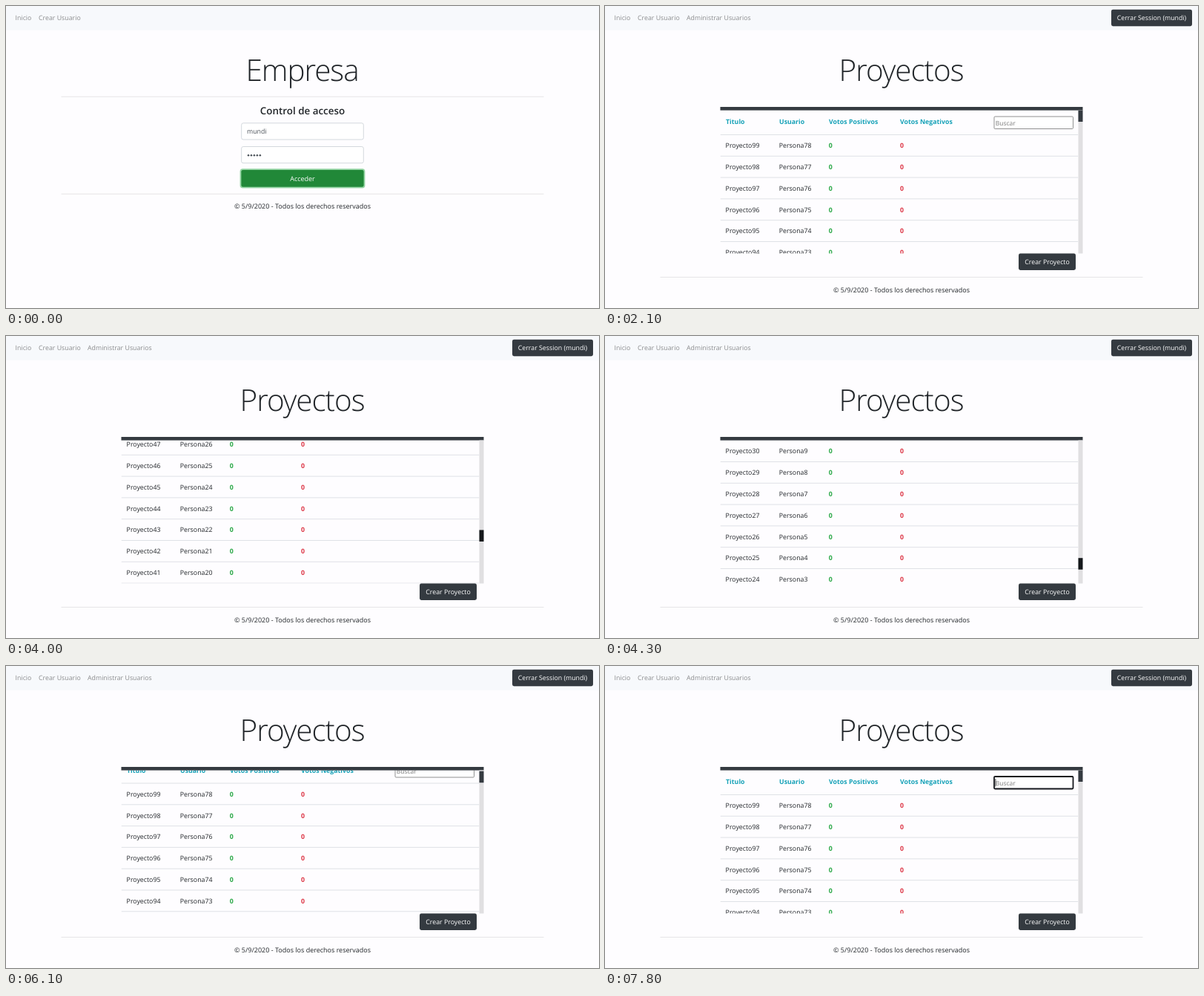
These frames come from a looping animation (800x407 px, 8 s). An HTML page:

```html
<!DOCTYPE html>
<html lang="es">
<head>
<meta charset="utf-8">
<title>Proyectos</title>
<style>
  html, body { margin: 0; width: 100%; height: 100%; overflow: hidden; background: #fefdff; }
  svg { display: block; }
  text {
    font: 8.8px "Open Sans", "Noto Sans", sans-serif;
    fill: #212529;
    text-rendering: geometricPrecision;
    white-space: pre;
  }
  .mid { text-anchor: middle; }
  .title { font-size: 40.5px; font-weight: 300; letter-spacing: -1.1px; }
  .sub { font-size: 13.4px; font-weight: 600; }
  .foot, .access { font-size: 9px; }
  .nav { fill: #8b8c8e; }
  .field { fill: #495057; }
  .hint { font-size: 8.5px; fill: #7d7d7d; }
  .light { fill: #fff; }
  .head, .up, .down { font-weight: 700; }
  .head { fill: #17a2b8; }
  .up { fill: #28a745; }
  .down { fill: #dc3545; }
</style>
</head>
<body>
<svg id="stage" width="800" height="407" viewBox="0 0 800 407">
  <defs><clipPath id="view"><rect x="155.5" y="140.5" width="483" height="193"/></clipPath></defs>
</svg>
<script>
const LOOP = 8000, STEP = 100;
const ROWS = 84, ROW_H = 28.8, MAX_SCROLL = 2259;
const VIEW_TOP = 140.5, THUMB_RUN = 177.5;
const DARK = '#343a40';

// time, scroll offset
const SCROLL = [
  [3700, 0], [3800, 400], [4000, 1539.6], [4200, 1960], [4350, 2050], [4500, 1930],
  [4700, 1727.2], [5000, 820], [5300, 0], [5800, 0], [6100, 15.5],
  [6400, 280], [6700, 520], [6800, 520], [7200, 160], [7500, 0]
];

const stage = document.getElementById('stage');

function add(parent, tag, attrs, content) {
  const el = document.createElementNS('http://www.w3.org/2000/svg', tag);
  for (const key in attrs) el.setAttribute(key, attrs[key]);
  if (content !== undefined) el.textContent = content;
  parent.appendChild(el);
  return el;
}
const group = (parent, attrs = {}) => add(parent, 'g', attrs);
const label = (parent, x, y, content, cls = '') => add(parent, 'text', { x, y, class: cls }, content);
const box = (parent, x, y, width, height, fill, more = {}) =>
  add(parent, 'rect', { x, y, width, height, fill, ...more });
const rule = (parent, x, y, width, fill = '#e6e5e7') => box(parent, x, y, width, 1, fill);

function footer(parent, y) {
  rule(parent, 74.5, y, 651);
  label(parent, 400, y + 20.5, '© 5/9/2020 - Todos los derechos reservados', 'foot mid');
}

function button(parent, x, y, width, content) {
  box(parent, x, y, width, 22.5, DARK, { rx: 2.4 });
  label(parent, x + width / 2, y + 14.5, content, 'light mid');
}

// Shared navigation bar
box(stage, 0, 0, 800, 407, '#fefdff');
box(stage, 0, 0, 800, 32.5, '#f7f9fc');
label(stage, 12.6, 19.3, 'Inicio', 'nav');
label(stage, 44, 19.3, 'Crear Usuario', 'nav');

// Access form
const login = group(stage);
label(login, 399.5, 101.2, 'Empresa', 'title mid');
rule(login, 74.5, 121.7, 651);
label(login, 400, 146, 'Control de acceso', 'sub mid');
for (const y of [157.8, 189.5])
  box(login, 317.7, y, 164.6, 22.2, '#fff', { rx: 2.4, stroke: '#ced4da', 'stroke-width': 0.9 });
label(login, 325, 172.3, 'mundi', 'field');
for (let i = 0; i < 5; i++)
  add(login, 'circle', { cx: 327 + i * 3.95, cy: 201.2, r: 1.25, fill: '#495057' });
box(login, 315.6, 219.3, 168.8, 26.2, '#93d4a2', { rx: 3.8 });
const access = box(login, 317.4, 221.1, 165.2, 22.7, '#28a745', { rx: 2.2 });
label(login, 400, 235.8, 'Acceder', 'access light mid');
footer(login, 252.8);

// Project list
const projects = group(stage);
label(projects, 110, 19.3, 'Administrar Usuarios', 'nav');
button(projects, 683, 4.7, 109, 'Cerrar Session (mundi)');
label(projects, 399.5, 101.2, 'Proyectos', 'title mid');

const list = group(group(projects, { 'clip-path': 'url(#view)' }));
[[163, 'Titulo'], [235, 'Usuario'], [302, 'Votos Positivos'], [398, 'Votos Negativos']]
  .forEach(([x, name]) => label(list, x, 159, name, 'head'));
const search = box(list, 525, 149, 106.5, 16.5, '#fff', { rx: 1.2 });
label(list, 526.8, 160.5, 'Buscar', 'hint');
const caret = box(list, 526.5, 152, 0.8, 10.5, '#222');

for (let i = 0; i < ROWS; i++) {
  const n = 99 - i, y = 191.2 + i * ROW_H;
  rule(list, 155.5, y - 18.2, 483, '#dfe2e6');
  label(list, 162.6, y, 'Proyecto' + n);
  label(list, 234.8, y, 'Persona' + (n > 21 ? n - 21 : n));
  label(list, 301.8, y, '0', 'up');
  label(list, 398, y, '0', 'down');
}

box(projects, 155.5, 136, 489, 4.6, DARK);
box(projects, 638.5, VIEW_TOP, 6, 193, '#e0dfe1');
const thumb = box(projects, 638.5, VIEW_TOP, 6, 15.5, DARK);
button(projects, 558, 333.5, 77, 'Crear Proyecto');
footer(projects, 365);

function scrollAt(t) {
  const next = SCROLL.findIndex(key => key[0] > t);
  if (next <= 0) return 0;
  const [t0, a] = SCROLL[next - 1], [t1, b] = SCROLL[next];
  return a + (b - a) * (t - t0) / (t1 - t0);
}

function draw(now) {
  const t = Math.floor(now % LOOP / STEP) * STEP;
  const onList = t >= 2100;
  login.style.display = onList ? 'none' : '';
  projects.style.display = onList ? '' : 'none';
  access.setAttribute('fill', t < 1300 ? '#218838' : '#28a745');

  const scroll = scrollAt(t);
  list.setAttribute('transform', `translate(0 ${-scroll})`);
  thumb.setAttribute('y', VIEW_TOP + scroll / MAX_SCROLL * THUMB_RUN);
  thumb.setAttribute('fill', t >= 3100 && t < 5300 ? '#15181b' : DARK);

  const focus = t >= 7800, hover = t === 2700;
  search.setAttribute('stroke', focus ? '#15171c' : hover ? '#4f4f4f' : '#858585');
  search.setAttribute('stroke-width', focus ? 1.8 : 0.9);
  caret.style.display = focus ? '' : 'none';
}

function tick() {
  draw(performance.now());
  requestAnimationFrame(tick);
}
tick();
</script>
</body>
</html>
```
